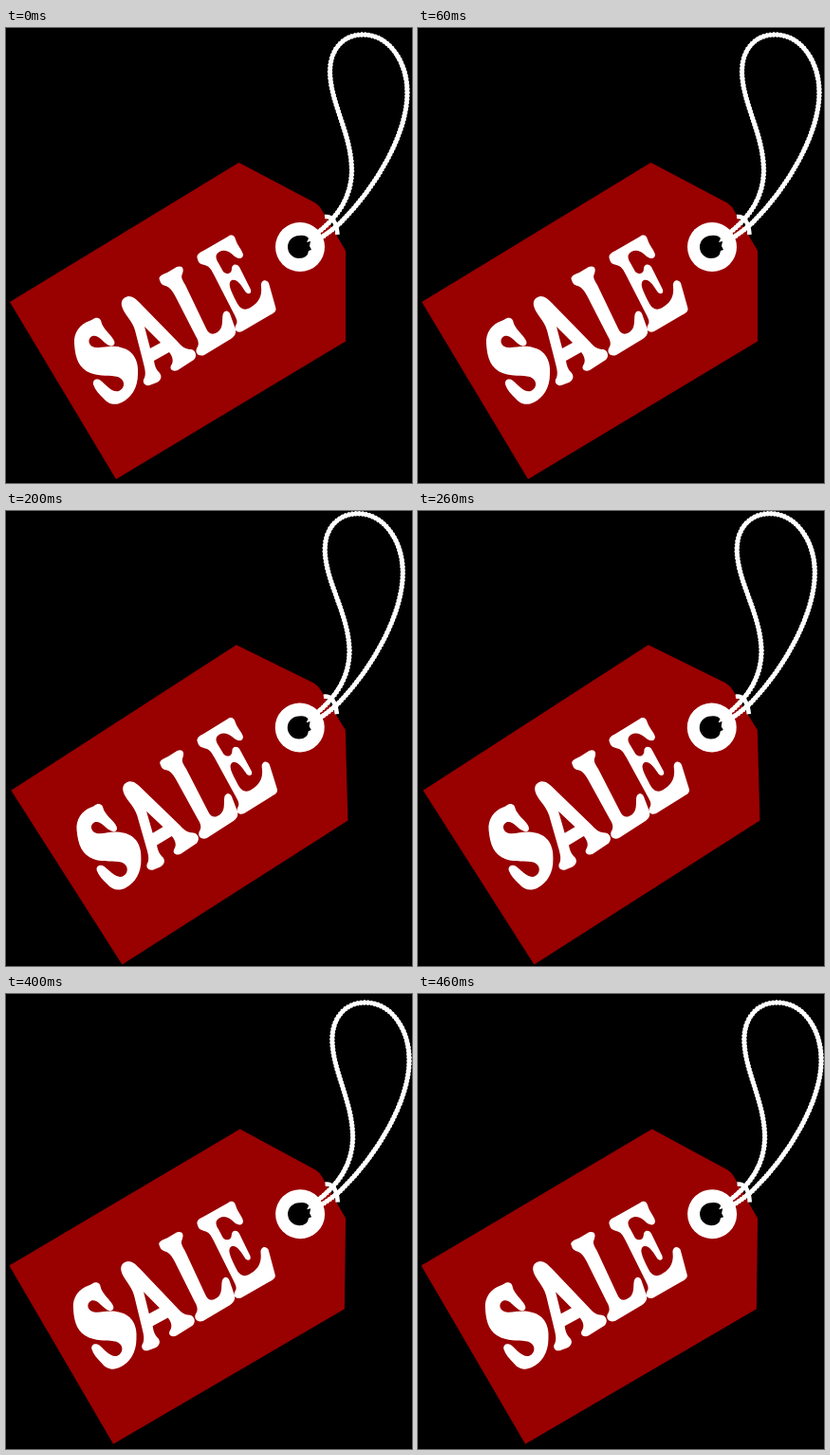
Write an HTML page that moves like this. It is 428x480 px and loops after 0.5 s.

```html
<!DOCTYPE html>
<html lang="en">
<head>
<meta charset="utf-8">
<title>Sale tag</title>
<style>
  html, body { margin: 0; width: 100%; height: 100%; overflow: hidden; background: #000; }
  svg { display: block; width: 428px; height: 480px; }
  .cord { fill: none; stroke: #fff; stroke-width: 4.6; }
  .fray { fill: none; stroke: #fff; stroke-width: 5.4; stroke-dasharray: 1.6 2; }
</style>
</head>
<body>
<svg viewBox="0 0 428 480" role="img" aria-label="SALE">
  <defs>
    <path id="loop" d="M326 218 C346 203 364 182 364.5 151 C364.5 112 342 80 341.5 46 C341.5 22 356 7 376 7 C405 7 423 37 423 68 C423 112 390 168 352 206 Q343 214 331 222"/>
  </defs>
  <g id="tag">
    <path id="card" fill="#900" d="M245.5 142 L326 184.5 Q330 187 333 192 L358 235 V330.5 L116 476 L4 289 Z"/>
    <g id="word" fill="#fff" fill-rule="evenodd">
      <path d="M72 333 C71 322 78 312 88 309 C92 308 93 305 97 306 C101 307 100 311 102 314
        C106 321 112 325 114 330 C116 335 111 337 107 334 C101 330 97 323 91 325
        C85 328 87 336 94 337 C102 338 110 334 121 337 C135 340 140 352 139 365
        C139 380 132 390 122 395 C114 399 107 396 103 391 C98 386 94 382 92 376
        C91 371 96 369 100 372 C106 377 112 385 119 383 C126 380 126 371 118 368
        C110 366 100 368 89 364 C77 359 73 349 72 333 Z"/>
      <path d="M122 293 C121 287 124 284 129 283 C134 283 137 286 141 290 L181 331
        C186 337 190 339 195 339 C200 340 202 346 198 350 L181 361
        C176 363 172 360 174 356 C177 352 176 347 172 342 L156 351
        C157 358 159 361 162 364 C165 368 163 372 159 374 L151 377
        C146 378 143 373 146 369 C148 364 146 358 144 350 L136 319
        C133 308 124 302 122 293 Z M146 315 L152 338 L163 332 Z"/>
      <path d="M162 266 C160 262 165 260 170 258 L180 252 C186 250 188 254 186 259
        C184 263 186 266 189 271 L211 317 C214 324 219 324 224 320
        C230 315 227 306 229 301 C232 296 236 299 237 304 L242 318
        C243 323 240 326 237 328 L209 345 C203 347 199 343 201 338
        C204 334 203 330 200 325 L179 284 C175 276 172 273 168 272 C164 271 163 269 162 266 Z"/>
      <path d="M202 244 C200 239 204 237 208 235 L234 220 C238 217 241 219 242 223
        C244 230 249 234 250 239 C250 244 245 244 241 241 C236 236 231 233 225 236
        C220 239 221 243 224 248 L229 257 C233 261 238 259 238 254
        C238 249 243 248 246 252 L257 274 C260 279 257 282 253 279
        C249 273 244 264 238 266 C233 269 237 277 243 289 C247 297 252 299 259 294
        C267 289 270 282 269 273 C268 266 274 264 277 269 L284 294
        C286 299 282 301 278 303 L249 320 C244 322 240 319 242 314
        C245 310 243 307 240 301 L219 260 C216 254 214 251 209 250 C205 249 203 248 202 244 Z"/>
    </g>
    <circle cx="310" cy="231" r="26" fill="#fff"/>
    <path d="M309 219 Q316 218 319 222 L317 226 L321 225 L320 230 L322 234 L319 235 Q318 243 309 243 A12 12 0 0 1 309 219 Z"/>
    <use href="#loop" class="cord"/>
    <use href="#loop" class="fray"/>
    <path class="cord" d="M336 199 Q348 198 349.5 218"/>
  </g>
</svg>
<script>
  const tag = document.getElementById("tag");
  const card = document.getElementById("card");
  const STEP = 100;
  const about = (scale) =>
    `translate(214 240) scale(${scale}) translate(-214 -240)`;

  // The tag jerks between held angles, in degrees.
  const poses = [
    { angle: 0, size: 1 },
    { angle: 0.7, size: 1 },
    { angle: -1.55, size: 1 },
    { angle: -1.55, size: 0.995 },
    { angle: 0.7, size: 1 }
  ];

  function draw(ms) {
    const pose = poses[Math.floor(ms / STEP) % poses.length];
    tag.setAttribute("transform", `rotate(${pose.angle} 214 240)`);
    card.setAttribute("transform", about(pose.size));
  }

  const start = performance.now();
  function tick() {
    draw(performance.now() - start);
    requestAnimationFrame(tick);
  }
  draw(0);
  requestAnimationFrame(tick);
</script>
</body>
</html>
```
